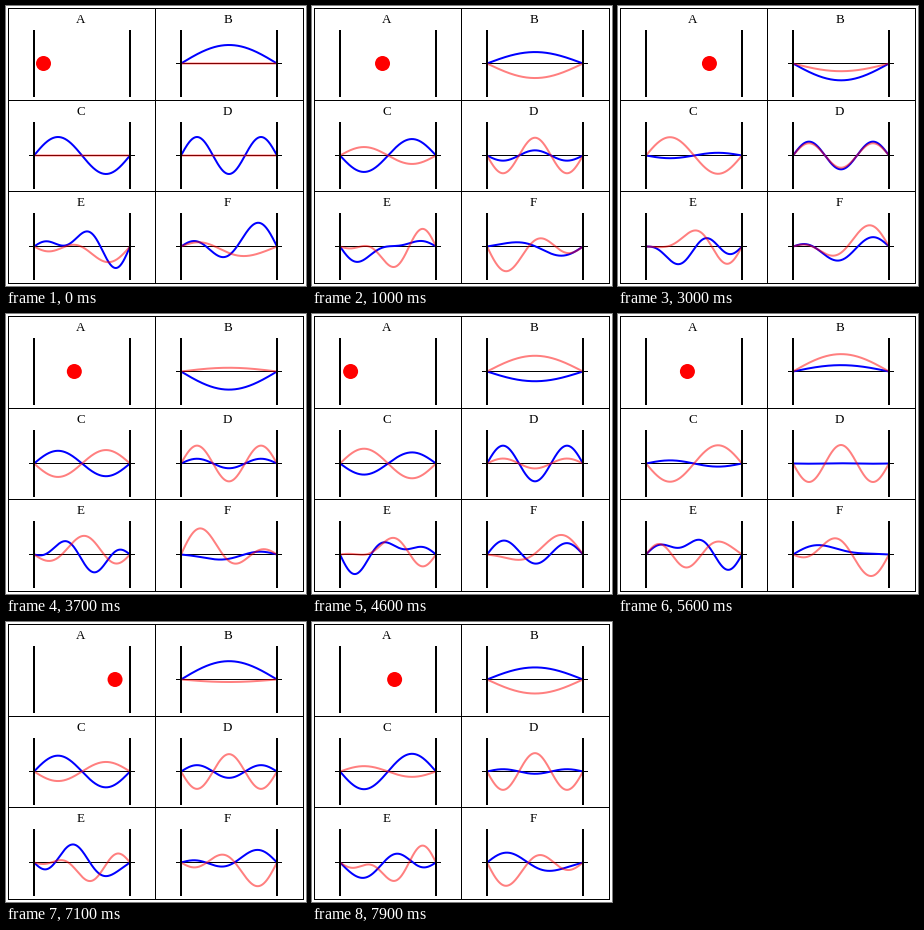
Write a matplotlib script that moves like this. It is 300x280 px and loops after 8 s.

```python
import numpy as np
import matplotlib
import matplotlib.pyplot as plt
from matplotlib.animation import FuncAnimation
from matplotlib.patches import Circle

matplotlib.rcParams["toolbar"] = "None"

W, H, DPI = 300, 280, 100
FRAMES, INTERVAL = 80, 100
CYCLE = 139                       # frames in two ground-state periods
AMP = 18.5
WELL = 96
BLUE, RED = "#0000ff", "#ff0000"

# Energy eigenstate amplitudes: mode -> (size in px, phase in degrees)
STATES = {
    "B": {1: (AMP, 0)},
    "C": {2: (AMP, 0)},
    "D": {3: (AMP, 0)},
    "E": {1: (7.5, -63.4), 2: (9.0, 44), 3: (11.7, 212.5), 4: (8.5, -5)},
    "F": {1: (6.2, -54), 2: (12.0, 150), 3: (12.4, 7)},
}
LEFTS = (28, 175)
MIDS = (57.5, 149.5, 240.5)

fig = plt.figure(figsize=(W / DPI, H / DPI), dpi=DPI, facecolor="white")
ax = fig.add_axes([0, 0, 1, 1])
ax.set_xlim(0, W)
ax.set_ylim(H, 0)
ax.axis("off")


def px(width):
    return width * 72 / DPI


def line(xs, ys, width, color="black", z=3, **kw):
    return ax.plot(xs, ys, color=color, lw=px(width), zorder=z, snap=False,
                   solid_capstyle="butt", **kw)[0]


def psi(name, u, frame):
    """Complex wavefunction in pixels at positions u in [0, 1]."""
    theta = 4 * np.pi * frame / CYCLE
    return sum(size * np.exp(1j * (np.radians(deg) - n * n * theta)) * np.sin(n * np.pi * u)
               for n, (size, deg) in STATES[name].items())


def ball_x(frame):
    """Bounce between the walls, three round trips per cycle."""
    s = (3 * frame / CYCLE) % 1
    return 37.5 + 76.5 * (1 - abs(1 - 2 * s))


# Table grid
for y in (2.5, 94.5, 185.5, 277.5):
    line([2, 298], [y, y], 1)
for x in (2.5, 149.5, 297.5):
    line([x, x], [2, 278], 1)

u = np.linspace(0, 1, 200)
curves = {}
for i, name in enumerate("ABCDEF"):
    left, mid = LEFTS[i % 2], MIDS[i // 2]
    ax.text(left + WELL / 2 - 1.5, mid - 40.5, name, family="Liberation Serif",
            fontsize=px(13), ha="center", va="baseline")
    for x in (left, left + WELL):
        line([x, x], [mid - 33.5, mid + 33.5], 2, z=5)
    if name in STATES:
        line([left - 5, left + WELL + 5], [mid, mid], 1, z=1)
        xs = left + WELL * u
        curves[name] = (line(xs, mid + 0 * u, 2, BLUE, 2),
                        line(xs, mid + 0 * u, 2, RED, 2.5, alpha=0.5))

ball = ax.add_patch(Circle((ball_x(0), MIDS[0]), 7.5, fc=RED, ec="none", zorder=6))


def draw(frame):
    ball.center = (ball_x(frame), MIDS[0])
    for name, (real, imag) in curves.items():
        mid = MIDS["ABCDEF".index(name) // 2]
        wave = psi(name, u, frame)
        real.set_ydata(mid - wave.real)
        imag.set_ydata(mid - wave.imag)
    return [ball] + [c for pair in curves.values() for c in pair]


anim = FuncAnimation(fig, draw, frames=FRAMES, interval=INTERVAL,
                     repeat=True, repeat_delay=0, blit=False)
plt.show()
```
